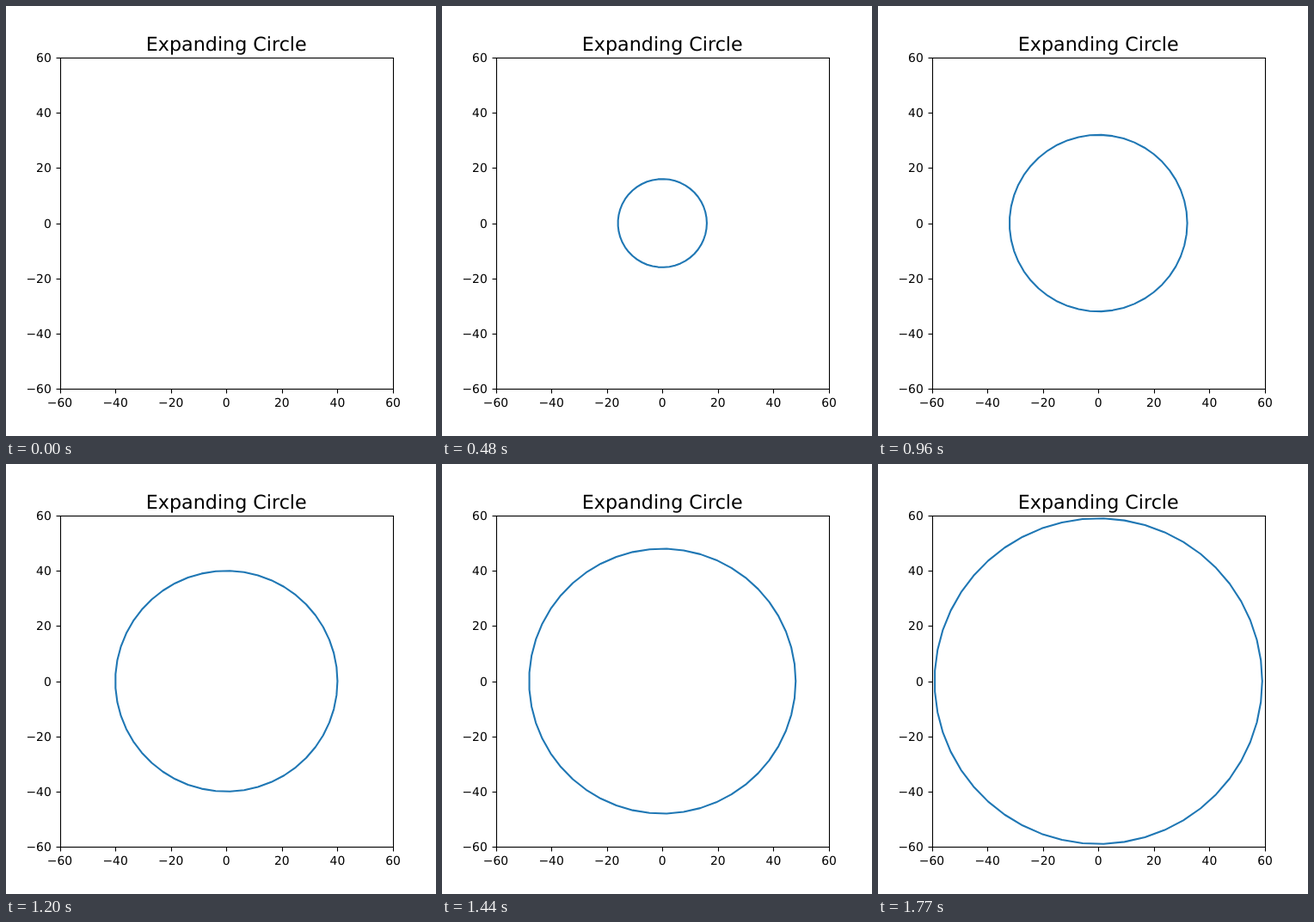
These frames come from a looping animation (500x500 px, 1800 ms). An HTML page with a canvas:

```html
<!DOCTYPE html>
<html lang="en">
<head>
<meta charset="utf-8">
<title>Expanding Circle</title>
<style>
  html, body { margin: 0; width: 100%; height: 100%; overflow: hidden; background: #fff; }
  canvas { display: block; width: 500px; height: 500px; }
</style>
</head>
<body>
<canvas id="stage" width="500" height="500"></canvas>
<script>
const ctx = document.getElementById('stage').getContext('2d');
const BOX = { left: 62.5, right: 450, top: 60, bottom: 445 };
const LIMIT = 60;
const STEP = 30, STEPS = 60;
const SEGMENTS = 49;
const FONT = '"DejaVu Sans", Verdana, sans-serif';
const PT = 100 / 72;

const toX = v => BOX.left + (v + LIMIT) / (2 * LIMIT) * (BOX.right - BOX.left);
const toY = v => BOX.bottom - (v + LIMIT) / (2 * LIMIT) * (BOX.bottom - BOX.top);
const snap = v => Math.floor(v + 0.5) + 0.5;

function line(x1, y1, x2, y2) {
  ctx.beginPath();
  ctx.moveTo(x1, y1);
  ctx.lineTo(x2, y2);
  ctx.stroke();
}

function text(str, x, y, points, align) {
  ctx.font = `${points * PT}px ${FONT}`;
  ctx.textAlign = align;
  ctx.fillText(str, x, y);
}

function drawAxes() {
  const left = snap(BOX.left), bottom = snap(BOX.bottom);
  ctx.strokeStyle = ctx.fillStyle = '#000';
  ctx.lineWidth = 0.8 * PT;
  ctx.lineCap = 'butt';
  ctx.lineJoin = 'miter';
  ctx.textBaseline = 'alphabetic';
  ctx.textRendering = 'geometricPrecision';
  ctx.strokeRect(left, snap(BOX.top), snap(BOX.right) - left, bottom - snap(BOX.top));

  for (let v = -LIMIT; v <= LIMIT; v += 20) {
    const x = toX(v), y = toY(v);
    const label = (v < 0 ? '\u2212' : '') + Math.abs(v);
    line(snap(x), bottom, snap(x), bottom + 5);
    line(left, snap(y), left - 5, snap(y));
    text(label, x, 466, 10, 'center');
    text(label, BOX.left - 7 * PT, Math.round(y + 5), 10, 'right');
  }
  text('Expanding Circle', (BOX.left + BOX.right) / 2, 52, 16, 'center');
}

// The ring is an open polyline whose two ends meet on the right.
function drawRing(r) {
  if (!r) return;
  ctx.beginPath();
  for (let i = 0; i <= SEGMENTS; i++) {
    const a = i / SEGMENTS * 2 * Math.PI;
    ctx.lineTo(toX(r * Math.cos(a)), toY(r * Math.sin(a)));
  }
  ctx.strokeStyle = '#1f77b4';
  ctx.lineWidth = 1.5 * PT;
  ctx.lineCap = 'square';
  ctx.lineJoin = 'round';
  ctx.stroke();
}

const start = performance.now();

function draw() {
  const t = performance.now() - start;
  ctx.fillStyle = '#fff';
  ctx.fillRect(0, 0, 500, 500);
  drawRing(Math.floor(t / STEP) % STEPS);
  drawAxes();
  requestAnimationFrame(draw);
}
draw();
</script>
</body>
</html>
```
